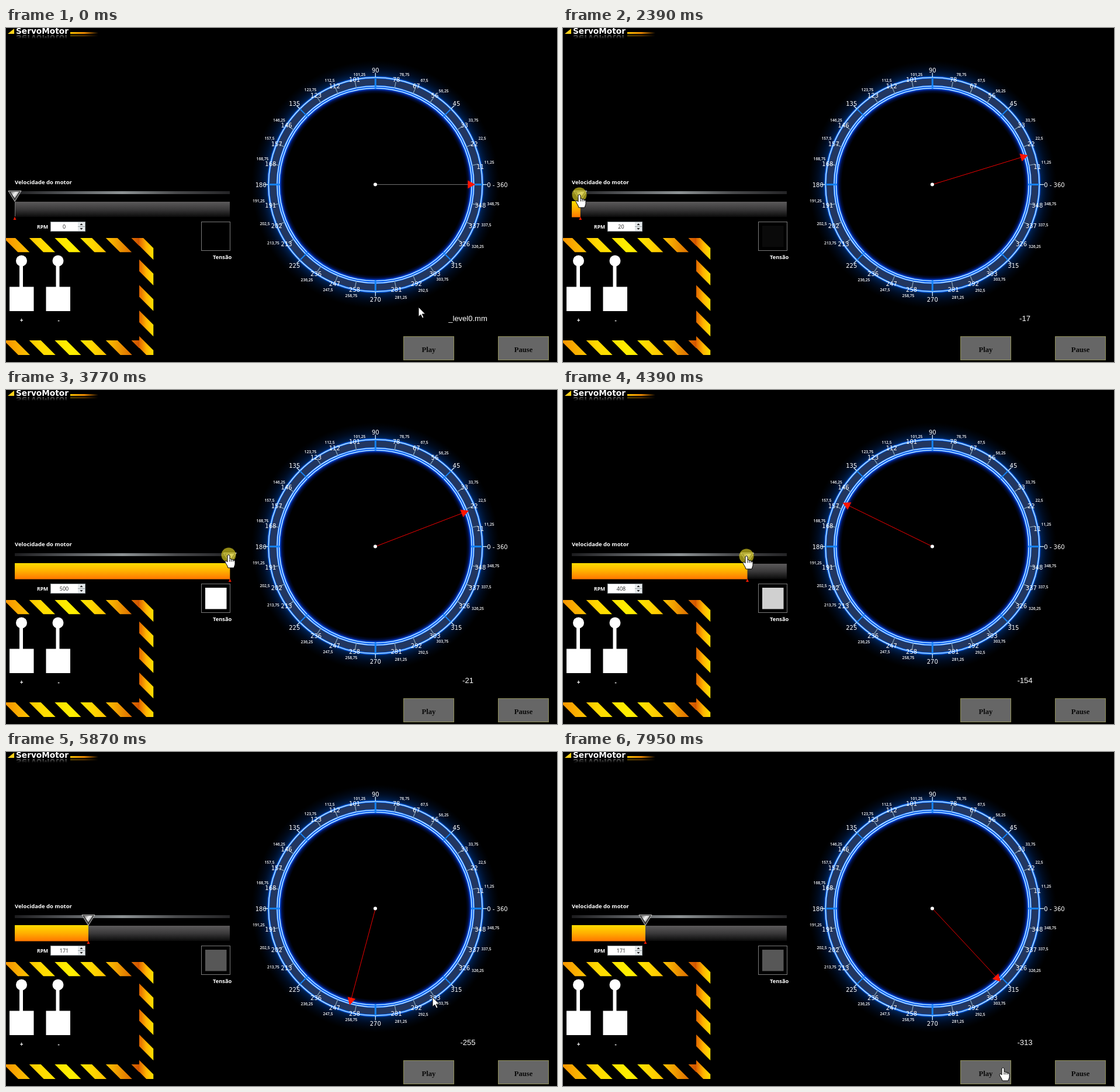
An HTML page with a canvas for the animation above (8000 ms loop, 943 px wide and 571 px high).

```html
<!DOCTYPE html>
<html lang="pt">
<head>
<meta charset="utf-8">
<title>ServoMotor</title>
<style>
html, body { margin: 0; width: 100%; height: 100%; overflow: hidden; background: #000; }
canvas { display: block; }
</style>
</head>
<body>
<canvas id="stage" width="943" height="571"></canvas>
<script>
const c = document.getElementById('stage').getContext('2d');
const LOOP = 8000, TICK = 77.1;          // the screen refreshes about 13 times a second
const CX = 632.3, CY = 267.6, START = 9;
const DEJA = '"DejaVu Sans", sans-serif', OPEN = '"Open Sans", sans-serif';

// Keys: [tick, value, ...]
const needleKeys = [[8.29, 0], [17, 541], [31, 1457], [41, 2048], [57, 3034], [76, 4215], [88.5, 4993]];
const rpmKeys = [[29, 0], [31, 20], [41, 317], [49, 500], [57, 408], [66, 171]];
const cursorKeys = [
  [0, 706, 477], [7, 752, 545], [10, 752, 545], [17, 213, 394], [19, 92, 330], [24, 15, 290],
  [27, 15, 287], [31, 28, 285], [41, 247.5, 281], [49, 381, 282], [57, 314, 284], [66, 140, 284],
  [69, 140, 285], [74, 560, 380], [76, 730, 419], [85, 867, 538], [89, 873, 544], [91, 873, 544],
  [94, 884, 546], [96, 884, 546], [103, 753, 540]];

// Small outer labels: step of 11.25 degrees, x, y
const outerLabels = [
  [1, 827, 229], [2, 815, 188.5], [3, 800, 157.5], [5, 749, 107.5], [6, 716, 89.5], [7, 682, 79.5],
  [9, 605, 79], [10, 554, 89], [11, 521, 105.5], [13, 467.5, 157], [14, 451, 188.5], [15, 439, 223.5],
  [17, 432.5, 295], [18, 443, 334], [19, 457.5, 367.5], [21, 515, 430.5], [22, 551, 447], [23, 591, 457.5],
  [25, 676, 460], [26, 714, 448], [27, 747, 429.5], [29, 807.5, 373], [30, 822, 336], [31, 834, 300]];

function at(keys, t) {
  if (t <= keys[0][0]) return keys[0].slice(1);
  for (let i = 1; i < keys.length; i++) {
    const a = keys[i - 1], b = keys[i];
    if (t <= b[0]) {
      const k = (t - a[0]) / (b[0] - a[0]);
      return a.slice(1).map((v, j) => v + (b[j + 1] - v) * k);
    }
  }
  return keys[keys.length - 1].slice(1);
}

function rect(x, y, w, h, fill, line) {
  c.fillStyle = fill;
  c.fillRect(x, y, w, h);
  if (line) {
    c.strokeStyle = line;
    c.lineWidth = 1;
    c.strokeRect(x + .5, y + .5, w - 1, h - 1);
  }
}

function poly(points, fill, line) {
  c.beginPath();
  points.forEach(p => c.lineTo(...p));
  c.closePath();
  c.fillStyle = fill;
  c.fill();
  if (line) { c.strokeStyle = line; c.lineWidth = 1; c.stroke(); }
}

function disc(x, y, r, fill) {
  c.beginPath();
  c.arc(x, y, r, 0, 7);
  c.fillStyle = fill;
  c.fill();
}

function ring(r, width, color) {
  c.beginPath();
  c.arc(CX, CY, r, 0, 7);
  c.strokeStyle = color;
  c.lineWidth = width;
  c.stroke();
}

function text(s, x, y, font, fill = '#fff', align = 'center') {
  c.font = font;
  c.fillStyle = fill;
  c.textAlign = align;
  c.fillText(s, x, y);
}

function shade(x0, y0, x1, y1, ...stops) {
  const g = c.createLinearGradient(x0, y0, x1, y1);
  stops.forEach((s, i) => g.addColorStop(i / (stops.length - 1), s));
  return g;
}

const polar = (r, deg) => [CX + r * Math.cos(deg * Math.PI / 180), CY - r * Math.sin(deg * Math.PI / 180)];

function ray(deg, r0, r1, color, width) {
  c.beginPath();
  c.moveTo(...polar(r0, deg));
  c.lineTo(...polar(r1, deg));
  c.strokeStyle = color;
  c.lineWidth = width;
  c.stroke();
}

function header() {
  poly([[3, 10], [14, 1], [14, 10]], '#ffd21a');
  const bar = shade(110, 0, 158, 0, '#ffc400', '#f08a00', '#000');
  rect(110, 7, 48, 3, bar);
  const font = 'bold 13.7px ' + DEJA;
  text('ServoMotor', 17, 10, font, '#fff', 'left');
  c.save();
  c.beginPath();
  c.rect(0, 11, 165, 7);
  c.clip();
  c.translate(0, 21.5);
  c.scale(1, -1);
  text('ServoMotor', 17, 10, font, shade(0, 10, 0, 3, '#666', '#000'), 'left');
  c.globalAlpha = .3;
  rect(110, 7, 48, 3, bar);
  c.restore();
}

function band(x, y, w, h, fill, vertical) {
  c.save();
  c.beginPath();
  c.rect(x, y, w, h);
  c.clip();
  for (let k = 0; k < 7; k++) {
    const p = 43.7 * k;
    if (vertical) {
      const top = y - 7 + p;
      poly([[x, top], [x + w, top + w], [x + w, top + w + 20], [x, top + 20]], fill);
    } else {
      const left = x - 4 + p;
      poly([[left, y], [left + 20, y], [left + 20 + h, y + h], [left + h, y + h]], fill);
    }
  }
  c.restore();
}

function hazard() {
  const across = shade(0, 0, 228, 0, '#f79400', '#ffd800', '#fff000', '#ffc400', '#d35400');
  band(0, 359, 228, 24.5, across);
  band(0, 534, 228, 25, across);
  band(228, 359, 24.5, 200, shade(228, 0, 252, 0, '#e06400', '#ffb400', '#ffe000'), true);
  [26.5, 89].forEach((x, i) => {
    disc(x, 398, 9.5, '#fff');
    rect(x - 3.5, 404, 6, 40, '#fff');
    rect(x - 20.5, 442.5, 41.5, 41.5, '#fff');
    text('+-'[i], x + i, 503, 'bold 10px ' + OPEN);
  });
}

function dial() {
  const g = c.createRadialGradient(CX, CY, 155, CX, CY, 212);
  [[0, 'rgba(0,40,200,0)'], [.08, 'rgba(0,50,220,.25)'], [.16, 'rgba(0,80,255,.9)'],
   [.49, 'rgba(0,90,220,.8)'], [.56, 'rgba(0,60,150,.5)'], [.72, 'rgba(0,40,110,.3)'],
   [1, 'rgba(0,20,60,0)']].forEach(s => g.addColorStop(...s));
  disc(CX, CY, 212, g);
  ring(175.5, 15, '#22365f');
  [[183, 3.6], [168.3, 3], [164.8, 3]].forEach(([r, w]) => {
    ring(r, w, '#0a6cff');
    ring(r, 1.3, '#d4eeff');
  });
  for (let i = 0; i < 32; i++) {
    const deg = i * 11.25, main = i % 4 == 0;
    if (!main) {
      ray(deg, 168, 179, '#7d9cb4', 1.4);
      continue;
    }
    ray(deg, 164, 183, '#1482f5', i % 8 ? 2 : 3);
    ray(deg, 183, 191, '#cfeaff', 1.3);
  }
  for (let i = 1; i < 32; i++) {
    const main = i % 4 == 0, [x, y] = polar(main ? 196 : 183, i * 11.25);
    text(Math.floor(i * 11.25), x, y + (i == 1 ? 9 : 4), '10px ' + DEJA);
  }
  text('0 - 360', 841, 272, '10px ' + DEJA);
  outerLabels.forEach(([i, x, y]) =>
    text(String(i * 11.25).replace('.', ','), x, y + 2.5, '600 6.7px ' + OPEN));
}

function needle(deg, started) {
  ray(deg, 0, 160, started ? '#f00000' : '#777', 1);
  c.save();
  c.translate(CX, CY);
  c.rotate(-deg * Math.PI / 180);
  poly([[158, -7], [171, 0], [158, 7]], '#ff1400');
  c.restore();
  disc(632, 267.5, 3, '#fff');
}

function slider(rpm) {
  const x = 15 + rpm * .7366;
  text('Velocidade do motor', 15, 267, 'bold 9.5px ' + OPEN, '#fff', 'left');
  rect(15, 279, 368, 5, shade(15, 0, 383, 0, '#1c1c1e', '#55575a', '#8d9294', '#48494b', '#242426'));
  rect(15, 297, 368, 26, shade(0, 297, 0, 323, '#5c5a5b', '#3a393a', '#0a0a0a'));
  if (rpm) rect(15, 296, x - 15, 27.5, shade(0, 296, 0, 323, '#ffdc00', '#ffb000', '#ff7800'));
  else rect(15, 297, 1, 25, '#777');
  poly([[x, 322.5], [x + 2.5, 328], [x - 2.5, 328]], '#e81800');
  poly([[x - 11, 278.5], [x + 11, 278.5], [x, 296.5]], '#3c3c3c', '#c8c8c8');
  poly([[x - 7.5, 280], [x + 7.5, 280], [x, 291]], shade(x - 7, 280, x + 5, 290, '#777', '#f4f4f4', '#888'));

  text('RPM', 53, 343, 'bold 8.6px ' + OPEN, '#fff', 'left');
  rect(76, 331, 60, 17, '#e4e8ea', '#9aa2a6');
  rect(77, 332, 46, 15, '#fff');
  text(Math.round(rpm), 99.5, 343, '9px ' + OPEN, '#222');
  rect(123, 339, 12, 1, '#9aa2a6');
  poly([[126.5, 337], [129, 334], [131.5, 337]], '#222');
  poly([[126.5, 342], [129, 345], [131.5, 342]], '#222');

  rect(334, 331, 50, 50, '#000', '#7a7a7a');
  const v = Math.round(rpm * .51);
  rect(341, 338, 36.5, 36.5, `rgb(${v},${v},${v})`);
  text('Tensão', 354, 395, 'bold 9.3px ' + OPEN, '#fff', 'left');
}

function button(label, x) {
  rect(x, 527, 87, 41, '#666', '#8f8f58');
  text(label, x + 43.5, 554, 'bold 12.6px "Liberation Serif", serif', '#0a0a0a');
}

const arrow = [[0, 0], [0, 16.5], [3.8, 13], [6.5, 19], [9, 18], [6.4, 12], [11.6, 12]];
const hand = new Path2D('M-2 1Q0-2 2 1V7Q4 5 5 8Q7 6 8 9Q11 8 11 11V16Q10 19 9 22H-1Q-2 18-5 14Q-7 11-5 10Q-4 10-2 12Z');

function cursor(x, y, pressed) {
  const onButton = y > 527 && (x > 680 && x < 767 || x > 842 && x < 929);
  const onSlider = x < 390 && y < 297;
  if (pressed) disc(x, y, 12.5, 'rgba(216,204,32,.68)');
  c.save();
  c.translate(x, y);
  if (onButton || onSlider) {
    c.fillStyle = '#fff';
    c.strokeStyle = '#000';
    c.lineWidth = 1;
    c.fill(hand);
    c.stroke(hand);
    c.beginPath();
    [2, 5, 8].forEach(i => { c.moveTo(i, 7.5); c.lineTo(i, 11.5); });
    c.stroke();
  } else poly(arrow, '#fff', '#000');
  c.restore();
}

function draw(ms) {
  const tick = Math.floor((ms % LOOP + 8) / TICK);
  const [deg] = at(needleKeys, tick), [rpm] = at(rpmKeys, tick), [x, y] = at(cursorKeys, tick);
  const started = tick >= START;
  rect(0, 0, 943, 571, '#000');
  header();
  slider(rpm);
  hazard();
  dial();
  needle(deg, started);
  text(started ? '-' + Math.round(deg) % 360 : '_level0.mm', 790.5, 501, '13px "Liberation Sans", sans-serif');
  button('Play', 680);
  button('Pause', 842);
  cursor(x, y, tick >= 27 && tick < 68);
}

let begin;
function frame(now) {
  begin ??= now;
  draw(now - begin);
  requestAnimationFrame(frame);
}
requestAnimationFrame(frame);
</script>
</body>
</html>
```
